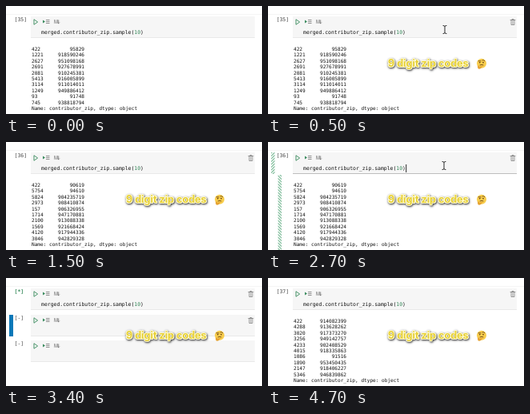
These frames come from a looping animation (320 px wide and 135 px high, 4.8 s). An HTML page with a canvas:

```html
<!DOCTYPE html>
<html lang="en">
<head>
<meta charset="utf-8">
<title>Sampling zip codes</title>
<style>
  html, body { margin: 0; width: 100%; height: 100%; overflow: hidden; background: #fff; }
  canvas { display: block; width: 320px; height: 135px; }
</style>
</head>
<body>
<canvas></canvas>
<script>
const LOOP = 4800, TICK = 100;
const MONO = '"DejaVu Sans Mono", monospace';
const CODE_FONT = `6.44px ${MONO}`, OUTPUT_FONT = `6.1px ${MONO}`;
const GREEN = '#388a5c';
const SHORT_ZIP_ROWS = ['08', '01', '6'];

const canvas = document.querySelector('canvas');
const dpr = window.devicePixelRatio || 1;
canvas.width = 320 * dpr;
canvas.height = 135 * dpr;
const ctx = canvas.getContext('2d');

function seeded(seed) {
  return () => (seed = seed * 16807 % 2147483647) / 2147483647;
}

// Ten rows of a random index and a five or nine digit zip code.
function sample(shortRows, run) {
  const random = seeded(9001 + run);
  return Array.from({ length: 10 }, (_, row) => {
    const index = String(Math.floor(random() * 6000));
    const zip = Math.floor(9e8 + random() * 6e7);
    const digits = shortRows.includes(row) ? 5 : 9;
    return index.padEnd(4) + String(zip).slice(0, digits).padStart(14);
  });
}
const samples = SHORT_ZIP_ROWS.map(sample);

function text(str, x, y, font = CODE_FONT, color = '#111') {
  ctx.font = font;
  ctx.fillStyle = color;
  ctx.fillText(str, x, y);
}

function rect(x, y, w, h, color) {
  ctx.fillStyle = color;
  ctx.fillRect(x, y, w, h);
}

function path(d, x, y, { fill, stroke, width = 1 }) {
  const shape = new Path2D(d);
  ctx.save();
  ctx.translate(x, y);
  ctx.lineJoin = ctx.lineCap = 'round';
  ctx.lineWidth = width;
  if (stroke) { ctx.strokeStyle = stroke; ctx.stroke(shape); }
  if (fill) { ctx.fillStyle = fill; ctx.fill(shape); }
  ctx.restore();
}

function disc(x, y, r, color) {
  ctx.fillStyle = color;
  ctx.beginPath();
  ctx.arc(x, y, r, 0, 2 * Math.PI);
  ctx.fill();
}

function cell(y, label, { code = false, trash = false, busy = false }) {
  rect(31, y, 280, 27, '#f6f6f6');
  rect(31, y + 26, 280, .8, '#e6e6e6');
  text(label, 10.5, y + 6, busy ? `bold ${CODE_FONT}` : CODE_FONT, busy ? GREEN : '#444');
  path('M0 0L4.3 3L0 6Z', 35.3, y + 4, { stroke: GREEN, width: .9 });
  path('M0 0L3 2L0 4Z', 46, y + 4.5, { fill: GREEN });
  for (let i = 0; i < 3; i++) rect(50, y + 4 + i * 2, 4.5, .8, '#777');
  text('M', 60, y + 8.8, '5.5px Inter, sans-serif', '#666');
  path('M0 0V4M-1 3L0 4L1 3', 65.7, y + 4.8, { stroke: '#666', width: .7 });
  if (trash) {
    path('M-3 0H3M-1 0V-1H1V0M-2 0V6H2V0M0 1V5', 306, y + 4.5, { stroke: '#777', width: .7 });
  }
  if (code) {
    const start = 'merged.contributor_zip.sample(';
    text(start + '  )', 44, y + 22.3);
    text('10', 44 + ctx.measureText(start).width, y + 22.3, CODE_FONT, GREEN);
  }
}

function output(rows) {
  [...rows, 'Name: contributor_zip, dtype: object']
    .forEach((row, i) => text(row, 32, 55.7 + i * 7.45, OUTPUT_FONT));
}

function hatch(x, y, w, h, slope) {
  ctx.save();
  ctx.beginPath();
  ctx.rect(x, y, w, h);
  ctx.clip();
  for (let top = y - 6; top < y + h + 6; top += 3.5) {
    path(`M0 0L${w} ${w * slope}`, x, top, { stroke: '#7dbb99', width: 1.1 });
  }
  ctx.restore();
}

function editMarks() {
  hatch(4, 13, 4.5, 27, -1);
  hatch(12.5, 41, 4.5, 94, 1);
  rect(31, 39, 280, .8, '#b5b5b5');
}

function emoji(x, y) {
  const ink = { stroke: '#6b4618', width: .9 };
  disc(x, y, 6, '#f8cd4c');
  disc(x - 2.3, y - 1.2, .9, ink.stroke);
  disc(x + 2, y - 1.2, .9, ink.stroke);
  path('M-4 -3H-1M1 -4Q3 -5 4 -3M-2 2Q0 1 2 2', x, y, ink);
  path('M-5 2L-3 4L2 3L0 5Q-1 7 -3 7Q-5 7 -5 4Z', x, y, { fill: '#e5a232' });
}

function caption() {
  const str = '9 digit zip codes', x = 150, y = 76.2;
  const font = 'bold 12.6px Inter, sans-serif';
  ctx.save();
  ctx.font = font;
  ctx.lineJoin = 'round';
  ctx.lineWidth = 2.2;
  ctx.strokeStyle = '#fffbd8';
  ctx.shadowColor = '#222';
  ctx.shadowBlur = 2.5 * dpr;
  ctx.shadowOffsetX = ctx.shadowOffsetY = .6 * dpr;
  ctx.strokeText(str, x, y);
  ctx.restore();
  text(str, x, y, font, '#e6cf35');
  emoji(267, 71.8);
}

function arrow(x, y) {
  path('M0 0V10L2 8L4 12L6 11L4 7H7Z', x, y, { fill: '#000', stroke: '#fff' });
}

function beam(x, y) {
  const shape = 'M-2 -5Q0 -5 0 -4Q0 -5 2 -5M0 -4V4M-2 5Q0 5 0 4Q0 5 2 5';
  path(shape, x, y, { stroke: '#fff', width: 2 });
  path(shape, x, y, { stroke: '#222' });
}

function draw(now) {
  const t = Math.floor(now % LOOP / TICK) * TICK;
  const within = (a, b) => t >= a && t < b;
  ctx.setTransform(dpr, 0, 0, dpr, 0, 0);
  rect(0, 0, 320, 135, '#fff');
  rect(0, 10, 320, .6, '#eee');

  const run = t < 1500 ? 0 : t < 3500 ? 1 : 2;
  const advancing = within(3400, 3500);
  const busy = advancing || within(1400, 1500);
  cell(13, busy ? '[*]' : `[${35 + run}]`, { code: true, trash: t >= TICK, busy });
  if (advancing) {
    rect(4, 46, 5, 27, '#0b78b8');
    cell(46, '[-]', { trash: true });
    cell(78, '[-]', {});
  } else {
    output(samples[run]);
  }

  if (within(600, 1400) || within(2700, 3400)) editMarks();
  if (within(600, 1100) || within(2700, 3200)) rect(172.3, 28, .9, 10, '#111');
  if (t >= TICK) caption();

  if (within(100, 400)) {
    const left = (1 - (t - 100) / 400) ** 2;
    arrow(221 - 14 * left, 29 + 55 * left);
  }
  if (within(400, 1400)) beam(221, 29.5);
  if (within(2700, 3400)) beam(220, 29.5);
  requestAnimationFrame(draw);
}

requestAnimationFrame(draw);
</script>
</body>
</html>
```
